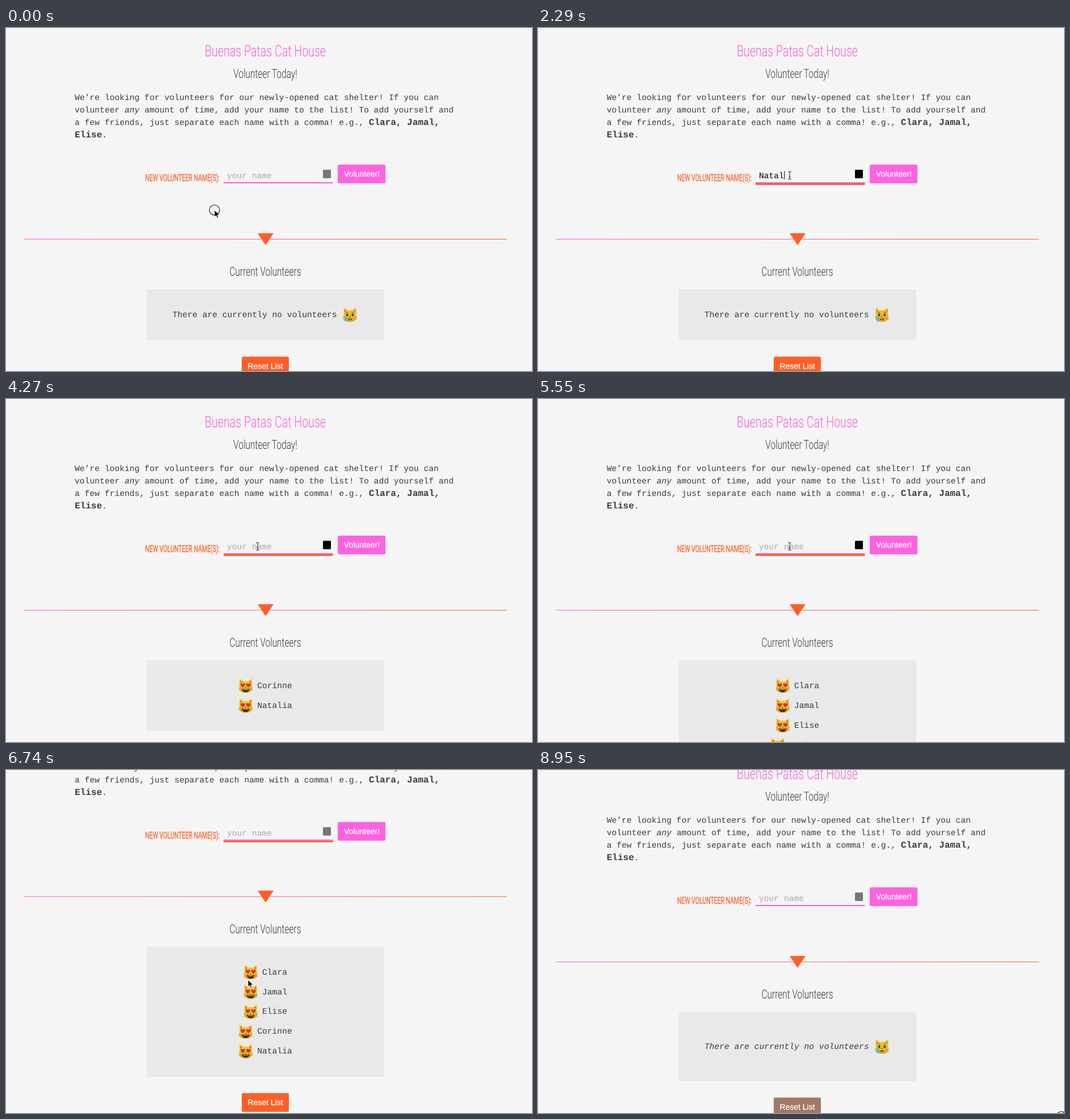
Write an HTML page that moves like this. It is 926 px wide and 605 px high and loops after 9050 ms.

```html
<!DOCTYPE html>
<html lang="en">
<head>
<meta charset="utf-8">
<title>Volunteer sign-up</title>
<style>
  html, body { margin: 0; width: 100%; height: 100%; overflow: hidden; background: #f5f5f5; }
  svg { display: block; }
  text { font: 14.63px "Liberation Mono", monospace; fill: #3b3b3b; white-space: pre; text-rendering: geometricPrecision; }
  .bold { font-weight: bold; font-size: 16px; }
  .italic { font-style: italic; }
  .head { font: 300 22px Roboto, sans-serif; text-anchor: middle; }
  .title { font-size: 28px; fill: #ff5fdc; }
  .label { font: 17px Roboto, sans-serif; fill: #ff5f27; stroke: #ff5f27; stroke-width: .25; }
  .button { font: 14px "Liberation Sans", sans-serif; fill: #fff; stroke: #fff; stroke-width: .25; text-anchor: middle; }
</style>
</head>
<body>
<svg width="926" height="605" viewBox="0 0 926 605">
  <defs>
    <linearGradient id="rule"><stop stop-color="#ff5fdc"/><stop offset="1" stop-color="#ff5f27"/></linearGradient>
    <linearGradient id="fur" x2="0" y2="1"><stop stop-color="#f7cf3c"/><stop offset="1" stop-color="#dba31c"/></linearGradient>
    <g id="head">
      <path d="M-11 2 L-11 -12.500 Q-7.500 -12 -4 -8 Q0 -9 4 -8 Q7.500 -12 11 -12.500 L11 2 Q13 12 0 12.500 Q-13 12 -11 2Z" fill="url(#fur)"/>
      <path d="M-9.500 -5 L-9.300 -10 L-6 -7Z M9.500 -5 L9.300 -10 L6 -7Z" fill="#b9822c"/>
      <path d="M-13 4 L-9 4.500 M-12.500 8 L-9 7 M13 4 L9 4.500 M12.500 8 L9 7" stroke="#b58a22" stroke-width=".7"/>
      <path d="M-1.500 2.500 H1.500 L0 4Z" fill="#6b3c20"/>
    </g>
    <path id="heart" d="M0 4.300 C-7 -.5 -3.500 -5 0 -1.800 C3.500 -5 7 -.5 0 4.300Z" fill="#dc3020"/>
    <g id="love">
      <use href="#head"/>
      <use href="#heart" x="-5" y="-1.500"/><use href="#heart" x="5" y="-1.500"/>
      <path d="M-7 5 Q0 6.500 7 5 Q6 11 0 11 Q-6 11 -7 5Z" fill="#3a2410"/>
      <path d="M-5 6 Q0 7.200 5 6 L4.500 7.200 H-4.500Z" fill="#e8dcc0"/>
    </g>
    <g id="cry">
      <use href="#head"/>
      <path d="M-7.500 -3.500 L-3 -5 M7.500 -3.500 L3 -5" stroke="#6b4a1a"/>
      <ellipse cx="-4.800" cy="0" rx="1.700" ry="2.300" fill="#3f2a16"/>
      <ellipse cx="4.800" cy="0" rx="1.700" ry="2.300" fill="#3f2a16"/>
      <path d="M-3 9 Q0 5 3 9" fill="none" stroke="#5a3818" stroke-width="1.400"/>
      <path d="M-7 2 Q-11.500 8 -9.500 10.500 Q-7 12.500 -4.800 10 Q-4 7.500 -7 2Z" fill="#55b4ee"/>
    </g>
    <path id="arrow" d="M0 0 V12.500 L2.900 9.800 L4.900 14.300 L7 13.400 L5 9 H9Z" fill="#000" stroke="#fff" stroke-width=".9"/>
    <path id="beam" d="M-3 -7 Q0 -7 0 -5 V5 Q0 7 -3 7 M3 -7 Q0 -7 0 -5 M3 7 Q0 7 0 5 M-1.500 2 H1.500" fill="none" stroke="#222"/>
    <path id="hand" d="M-2 0 Q-.5 -2 1 0 V5 Q3 4 3.500 5.500 Q5 5 5.500 6.500 Q7.500 6 7.500 8.500 L6.500 14.500 H-.5 L-4.500 9 Q-4 6.500 -2 8.500Z" fill="#fff" stroke="#000" stroke-width="1.100"/>
  </defs>

  <g id="page">
    <text class="head title" transform="translate(456.500 50) scale(.7 1)">Buenas Patas Cat House</text>
    <text class="head" transform="translate(456.500 87.500) scale(.7 1)">Volunteer Today!</text>
    <text x="121" y="127">We’re looking for volunteers for our newly-opened cat shelter! If you can</text>
    <text x="121" y="149">volunteer <tspan class="italic">any</tspan> amount of time, add your name to the list! To add yourself and</text>
    <text x="121" y="171">a few friends, just separate each name with a comma! e.g., <tspan class="bold">Clara, Jamal,</tspan></text>
    <text x="121" y="193"><tspan class="bold">Elise</tspan>.</text>

    <text class="label" transform="translate(245 270) scale(.615 1)">NEW VOLUNTEER NAME(S):</text>
    <text id="field" x="389" y="265"></text>
    <rect id="caret" y="252" width="1" height="15"/>
    <rect id="badge" x="558" y="250" width="14" height="15" rx="1.500"/>
    <rect x="383" y="272" width="192.500" height="2" fill="#f65fd6"/>
    <rect id="focus" x="383" y="274" width="192.500" fill="#ff5f27"/>
    <rect x="584" y="241" width="84" height="33" rx="2.500" fill="#ff63de"/>
    <text class="button" x="626.500" y="262">Volunteer!</text>

    <rect x="31" y="372" width="851" height="1" fill="url(#rule)"/>
    <path d="M443 362 H471 L457 383Z" fill="#ff5f27"/>
    <text class="head" transform="translate(456.500 437) scale(.7 1)">Current Volunteers</text>
    <rect id="panel" x="248" y="461" width="418" fill="#e9e9e9"/>
    <g id="list"></g>
    <g id="reset">
      <rect id="resetFill" x="415" width="83" height="33" rx="2.500"/>
      <text class="button" x="456.500" y="21">Reset List</text>
    </g>
  </g>
  <g id="pointer"><use id="cursor"/><circle id="ring" r="9" fill="none" stroke="#111" stroke-width="1.100"/></g>
</svg>
<script>
const LOOP = 9050, CHAR = 8.78, RESET = 7690;
const $ = id => document.getElementById(id);
const set = (id, attrs) => { for (const k in attrs) $(id).setAttribute(k, attrs[k]); };

// Value of the last key that has started.
const step = (t, keys) => {
  let value;
  for (const [start, ...rest] of keys) if (t >= start) value = rest;
  return value;
};
const within = (t, a, b) => t >= a && t < b;

// Text, key presses, time of submission.
const entries = [
  ["Natalia", [1840, 1930, 2020, 2200, 2290, 2380, 2470], 2650],
  ["Corinne", [2920, 3010, 3190, 3280, 3460, 3820, 3910], 4270],
  ["Clara, Jamal, Elise", [4810], 5550],
];
const scrollKeys = [[0, 0], [6290, 18], [6380, 65], [6560, 132], [6740, 149.3], [6920, 147.5],
  [7070, 145], [7370, 143], [7450, 142], [7570, 141.5], [RESET, 42], [7810, 34]];
const cursorKeys = [[0, "arrow", 367, 321], [860, "arrow", 374, 315], [950, "arrow", 412, 283],
  [1040, "beam", 443, 260], [5820, "beam", 441, 268], [5910, "arrow", 432, 312],
  [6030, "arrow", 427, 343], [6560, "arrow", 426, 362], [6740, "arrow", 426, 370],
  [6920, "arrow", 434, 480], [7070, "hand", 443, 562], [7220, "hand", 443, 573],
  [7370, "hand", 444, 580], [7450, "hand", 445, 583], [7950, "arrow", 722, 568],
  [8040, "none", 0, 0], [8950, "none", 921, 611.5]];
const focusKeys = [[0, 0], [1300, 1], [1390, 2], [1480, 2.8], [7450, 2], [7570, 1], [RESET, 0]];
const resetKeys = [[0, "#ff5f27"], [7370, "#e8683c"], [7450, "#d67a58"], [7570, "#bd8574"],
  [RESET, "#948077"], [7810, "#808080"], [8950, "#a37868"]];
const clicks = [[0, 90], [1210, 1390], [7570, RESET], [8950, LOOP]];

function drawField(t) {
  const entry = entries.find(([, keys, end]) => within(t, keys[0], end));
  const typed = entry ? entry[0].slice(0, entry[0].length - entry[1].filter(k => k > t).length) : "";
  $("field").textContent = typed || "your name";
  $("field").style.fill = typed ? "#000" : "#a8a8a8";
  set("caret", { x: 389 + typed.length * CHAR + .5, opacity: +(typed && !within(t, 5290, 5550)) });
  set("badge", { fill: within(t, 1040, 5910) ? "#000" : "#777" });
  set("focus", { height: step(t, focusKeys)[0] });
}

function drawList(t) {
  const cleared = t >= RESET;
  const names = cleared ? [] :
    entries.filter(e => e[2] <= t).reverse().flatMap(e => e[0].split(", "));
  const shift = cleared ? 16 : 0;
  const height = 55 + 34.9 * Math.max(1, names.length) + 2 * shift;
  $("list").innerHTML = names.map((name, i) => {
    const x = 473 - name.length * CHAR / 2, y = 510 + 34.9 * i;
    return `<use href="#love" x="${x - 20.3}" y="${y - 4}"/><text x="${x}" y="${y}">${name}</text>`;
  }).join("") || `<text x="293" y="${510 + shift}" class="${cleared ? "italic" : ""}">` +
    `There are currently no volunteers</text><use href="#cry" x="605.5" y="${506 + shift}"/>`;
  set("panel", { height });
  set("reset", { transform: `translate(0 ${489.9 + height})` });
  set("resetFill", { fill: step(t, resetKeys)[0] });
}

function draw(now) {
  const t = now % LOOP;
  drawField(t);
  drawList(t);
  set("page", { transform: `translate(0 ${-step(t, scrollKeys)[0]})` });
  const [shape, x, y] = step(t, cursorKeys);
  set("pointer", { transform: `translate(${x} ${y})` });
  set("cursor", { href: "#" + shape });
  set("ring", { opacity: +clicks.some(([a, b]) => within(t, a, b)) });
  requestAnimationFrame(draw);
}
draw(0);
</script>
</body>
</html>
```
